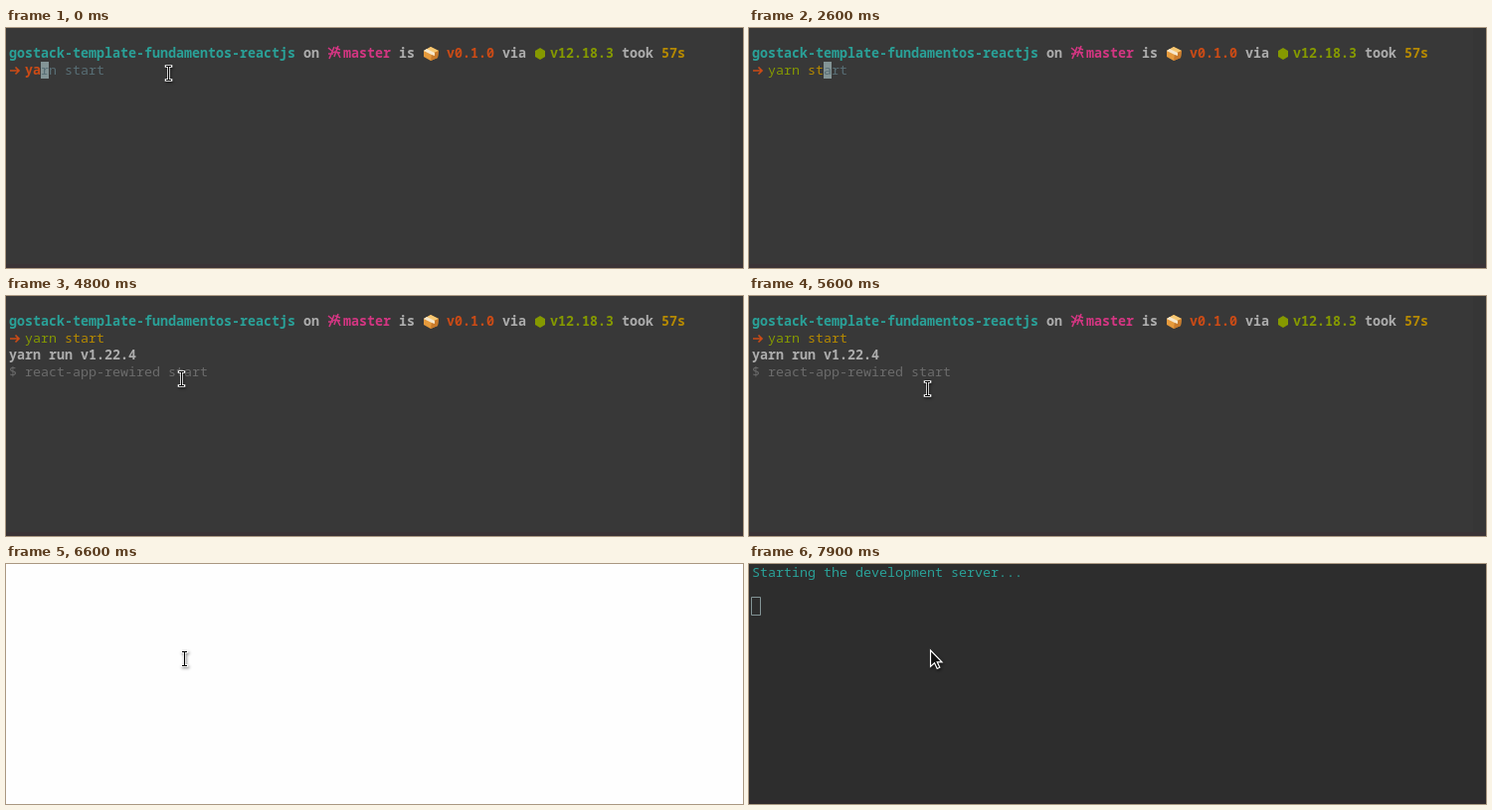
Write an HTML page with a canvas that moves like this. It is 741 px wide and 242 px high and loops after 8 s.

```html
<!DOCTYPE html>
<html lang="en">
<head>
<meta charset="utf-8">
<title>Terminal</title>
<style>
  html, body { margin: 0; width: 100%; height: 100%; overflow: hidden; background: #383838; }
  canvas { display: block; }
</style>
</head>
<body>
<canvas id="stage" width="741" height="242"></canvas>
<script>
const ctx = document.getElementById("stage").getContext("2d");
const LOOP = 8000, LEFT = 3, CELL = 8, LINE = 17, BLINK = 600;
const CYAN = "#2aa198", PINK = "#d33682", ORANGE = "#cb4b16", GREEN = "#859900",
      YELLOW = "#b58900", LIGHT = "#adadad", DIM = "#6b6b6b", HINT = "#586e75", BLOCK = "#839496";
const COMMAND = "yarn start";

// Each entry starts at its time; every change of the command line restarts the blinking.
const typing = [[-500, "ya"], [800, "yan"], [1600, "ya"], [1800, "yar"], [1900, "yarn"],
  [2100, "yarn "], [2400, "yarn s"], [2600, "yarn st"], [3100, COMMAND]];
const ENTER = 3800, CLEAR = 6200, PAGE = 6600, UNFOCUSED = 7900;
const pointerPath = [[0, 163, 45], [4400, 165, 48], [4800, 176, 83], [4900, 180, 85], [5000, 181, 85],
  [5200, 181, 85], [5600, 179, 93], [6300, 179, 93], [6400, 179, 95], [7400, 179, 95], [7600, 183, 89]];

const latest = (keys, t) => keys.filter(key => key[0] <= t).pop();

function pointerAt(t) {
  const from = latest(pointerPath, t);
  const to = pointerPath.find(key => key[0] > t) || from;
  // A long gap between equal or distant keys is a rest followed by a jump.
  const moving = to !== from && to[0] - from[0] <= 400;
  const k = moving ? (t - from[0]) / (to[0] - from[0]) : 0;
  return [1, 2].map(i => Math.round(from[i] + (to[i] - from[i]) * k) + 0.5);
}

function rect(x, y, w, h, color) {
  ctx.fillStyle = color;
  ctx.fillRect(x, y, w, h);
}

function shape(d, fill, stroke, width = 1) {
  const path = new Path2D(d);
  if (fill) { ctx.fillStyle = fill; ctx.fill(path); }
  if (stroke) { ctx.strokeStyle = stroke; ctx.lineWidth = width; ctx.stroke(path); }
}

function write(text, col, row, color, bold) {
  ctx.font = `${bold ? "bold " : ""}13.333px "Noto Sans Mono", "DejaVu Sans Mono", monospace`;
  ctx.fillStyle = color;
  [...text].forEach((ch, i) => ctx.fillText(ch, LEFT + (col + i) * CELL, row * LINE + 13));
}

function block(col, row, since, t) {
  if (Math.floor((t - since) / BLINK) % 2 === 0)
    rect(LEFT + col * CELL, row * LINE, CELL, LINE, BLOCK);
}

function prompt() {
  write("gostack-template-fundamentos-reactjs", 0, 1, CYAN, true);
  write("on", 37, 1, LIGHT, true);
  shape("M324 20l6 5M330 19l-5 12M324 26h5M331 20l5 2M334 18l-3 8M330 24l6 1M333 24l3 6M331 26l-1 3",
    null, PINK, 1.6);
  write("master", 42, 1, PINK, true);
  write("is", 49, 1, LIGHT, true);
  shape("M420 23l7-4 8 4-1 7-7 3-7-4z", "#e59a3c");
  shape("M420 23l7-4 8 4-7 3z", "#f7c873");
  shape("M428 26l7-3-1 7-7 3z", "#c87a2b");
  shape("M423 21l8 4v3l-3-1-8-4z", "#f6e7cb");
  write("v0.1.0", 55, 1, ORANGE, true);
  write("via", 62, 1, LIGHT, true);
  shape("M537 20l5 3v6l-5 3-5-3v-6z", GREEN);
  write("v12.18.3", 68, 1, GREEN, true);
  write("took", 77, 1, LIGHT, true);
  write("57s", 82, 1, YELLOW, true);
  shape("M4 43H13M9.5 39.5L13 43L9.5 46.5", null, ORANGE, 1.7);
}

function commandLine(t) {
  const [since, typed] = latest(typing, t);
  const end = 2 + typed.length;
  const known = typed.startsWith("yarn");
  if (t < ENTER) {
    block(end, 2, since, t);
    if (COMMAND.startsWith(typed)) write(COMMAND.slice(typed.length), end, 2, HINT);
  }
  write(typed.slice(0, 4), 2, 2, known ? GREEN : ORANGE, !known);
  write(typed.slice(4), 6, 2, YELLOW);
}

function output(t) {
  const rows = t < 3900 ? 0 : t < 4000 ? 1 : 2;
  if (rows > 0) write("yarn run v1.22.4", 0, 3, LIGHT, true);
  if (rows > 1) write("$ react-app-rewired start", 0, 4, DIM);
  block(0, 3 + rows, ENTER, t);
}

function terminal(t) {
  const focused = t < UNFOCUSED;
  rect(0, 0, 741, 242, focused ? "#383838" : "#2d2d2d");
  if (focused) rect(728, 0, 13, 238, "#363636");
  rect(0, 238, 741, 4, focused ? "#3a3336" : "#30292c");
  if (t >= CLEAR) {
    write("Starting the development server...", 0, 0, CYAN);
    if (focused) block(0, 2, CLEAR, t);
    else shape("M2.5 33.5h9v18h-9z", null, BLOCK);
  } else {
    prompt();
    commandLine(t);
    if (t >= ENTER) output(t);
  }
}

function pointer(t) {
  if (t >= 800 && t < 4400) return;
  ctx.save();
  ctx.shadowColor = "rgba(0,0,0,.45)";
  ctx.shadowBlur = 3;
  ctx.shadowOffsetX = 1;
  ctx.shadowOffsetY = 1.5;
  if (t >= UNFOCUSED) {
    shape("M182.5 87v16.5l4-3.7 2.7 5.7 2.6-1.2-2.6-5.5h4.8z", "#111", "#fff", 1.2);
  } else {
    ctx.translate(...pointerAt(t));
    const beam = "M-2.5-7H2.5M0-7V7M-2.5 7H2.5";
    ctx.lineCap = "square";
    shape(beam, null, "#fff", 2.6);
    ctx.shadowColor = "transparent";
    ctx.lineCap = "butt";
    shape(beam, null, "#000", 1.1);
  }
  ctx.restore();
}

function draw(now) {
  const t = Math.floor(now % LOOP / 100) * 100;
  if (t >= PAGE && t < UNFOCUSED) rect(0, 0, 741, 242, t === PAGE ? "#fefefe" : "#f9f9f9");
  else terminal(t);
  pointer(t);
}

const start = performance.now();
function tick() {
  draw(performance.now() - start);
  requestAnimationFrame(tick);
}
tick();
</script>
</body>
</html>
```
